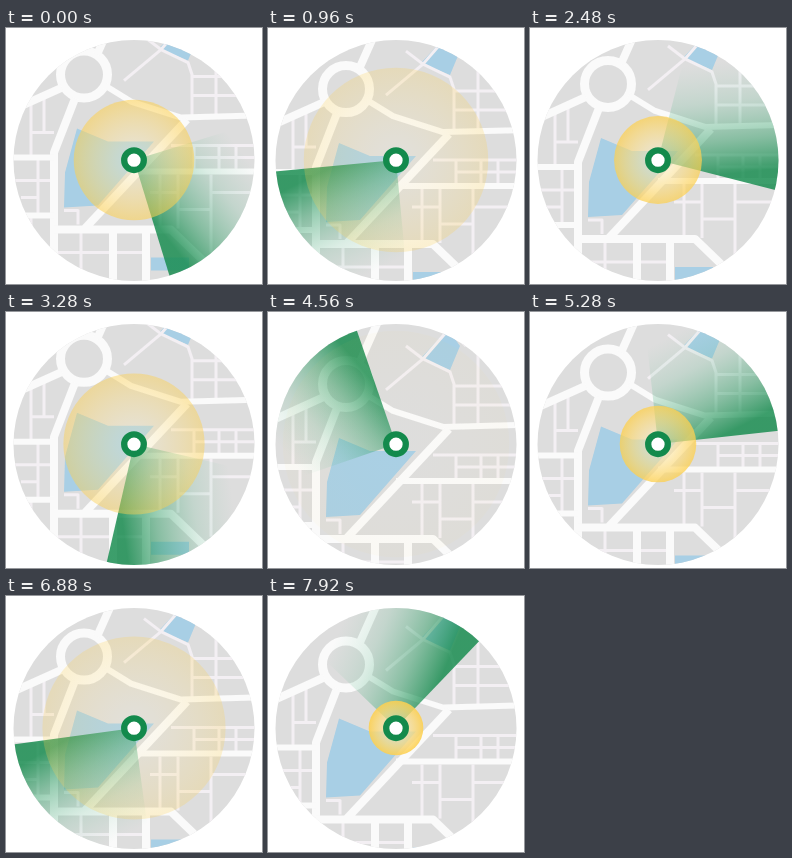
Write an HTML page that moves like this. It is 256x256 px and loops after 8 s.

```html
<!DOCTYPE html>
<html lang="en">
<head>
<meta charset="utf-8">
<title>Radar over a map</title>
<style>
html, body { margin: 0; height: 100%; overflow: hidden; background: #fff; }
svg { display: block; width: 100vw; height: 100vh; }
</style>
</head>
<body>
<svg viewBox="0 0 256 256">
  <defs>
    <clipPath id="disc"><circle cx="128" cy="132.5" r="120.5"/></clipPath>
    <!-- darkest at the outer end of the leading edge, which lies on the x axis -->
    <linearGradient id="fade" gradientUnits="userSpaceOnUse" x1="62" y1="0" x2="22" y2="-105">
      <stop offset="0" stop-color="#138a4c" stop-opacity=".82"/>
      <stop offset=".3" stop-color="#2b9c62" stop-opacity=".48"/>
      <stop offset=".65" stop-color="#4fb383" stop-opacity=".18"/>
      <stop offset="1" stop-color="#6cc499" stop-opacity="0"/>
    </linearGradient>
    <radialGradient id="glow">
      <stop offset="0" stop-color="#fff3cc" stop-opacity=".5"/>
      <stop offset=".5" stop-color="#fee08a" stop-opacity=".75"/>
      <stop offset="1" stop-color="#fdd04f"/>
    </radialGradient>
  </defs>
  <g clip-path="url(#disc)">
    <rect width="256" height="256" fill="#dddddd"/>
    <g id="map" fill="none" stroke-linejoin="round">
      <g fill="#a8cfe5">
        <path d="M71 126L102 139L148 139L92 203L58 205L59 170Z"/>
        <path d="M153 46L180 17L192 34L182 58Z"/>
        <path d="M145 255h38v13h-38z"/>
      </g>
      <path stroke="#f3eff3" stroke-width="3" d="
        M118 78L155 47L182 60L186 72V113 M155 47L138 34 M155 47L181 17L198 34 M210 30V113 M186 74H245 M186 93H245
        M165 143H250 M188 143V168 M213 143V168 M230 143V168 M188 155H250
        M154 172V226 M172 172V226 M205 172V250 M144 190H172 M172 207H205 M205 190H250
        M5 178H48 M25 100V155 M38 96V130 M25 130H48 M32 155V213 M15 195H32
        M58 208H72V222 M25 213V280 M75 228V280 M48 250H107 M107 250H140 M205 250H250"/>
      <g stroke="#fafafa" stroke-width="8">
        <circle cx="78" cy="72" r="23.5" stroke-width="9"/>
        <path d="M91 52L112 5 M56 85L5 108 M69 96L48 150V285"/>
        <path stroke-width="6" d="M99 83L125 99L175 115L250 113 M128 169H250 M0 155H48 M0 213H48"/>
        <path d="M181 117L77 228 M48 227H165L220 280 M107 228V285 M140 228V285"/>
      </g>
    </g>
    <path id="sweep" fill="url(#fade)" d="M0 0H125A125 125 0 0 0 0 -125Z"/>
    <circle id="pulse" cx="128" cy="132" fill="url(#glow)"/>
  </g>
  <circle cx="128" cy="132.2" r="9.8" fill="#fff" stroke="#138a4c" stroke-width="6.3"/>
</svg>
<script>
const LOOP = 8000, STEP = 80, CYCLE = 2970, LEAD = 1345;
const [map, sweep, pulse] = ['map', 'sweep', 'pulse'].map(id => document.getElementById(id));

function draw(now) {
  const t = Math.floor(now % LOOP / STEP) * STEP;
  const u = (t + LEAD) % CYCLE;
  const rise = 13 * (1 - Math.cos(2 * Math.PI * u / CYCLE));
  // one turn per cycle, with a short slowdown past the middle
  const lag = 7.75 * (1 + Math.tanh((u - 1640) / 200));
  const angle = 270.7 + 360 * u / CYCLE - lag;
  map.setAttribute('transform', `translate(0 ${-rise})`);
  sweep.setAttribute('transform', `translate(128 132) rotate(${angle})`);
  pulse.setAttribute('r', 15.5 + 0.0333 * u);
  pulse.setAttribute('opacity', 1 - u / 3050);
}

let start;
function tick(now) {
  start ??= now;
  draw(now - start);
  requestAnimationFrame(tick);
}
draw(0);
requestAnimationFrame(tick);
</script>
</body>
</html>
```
